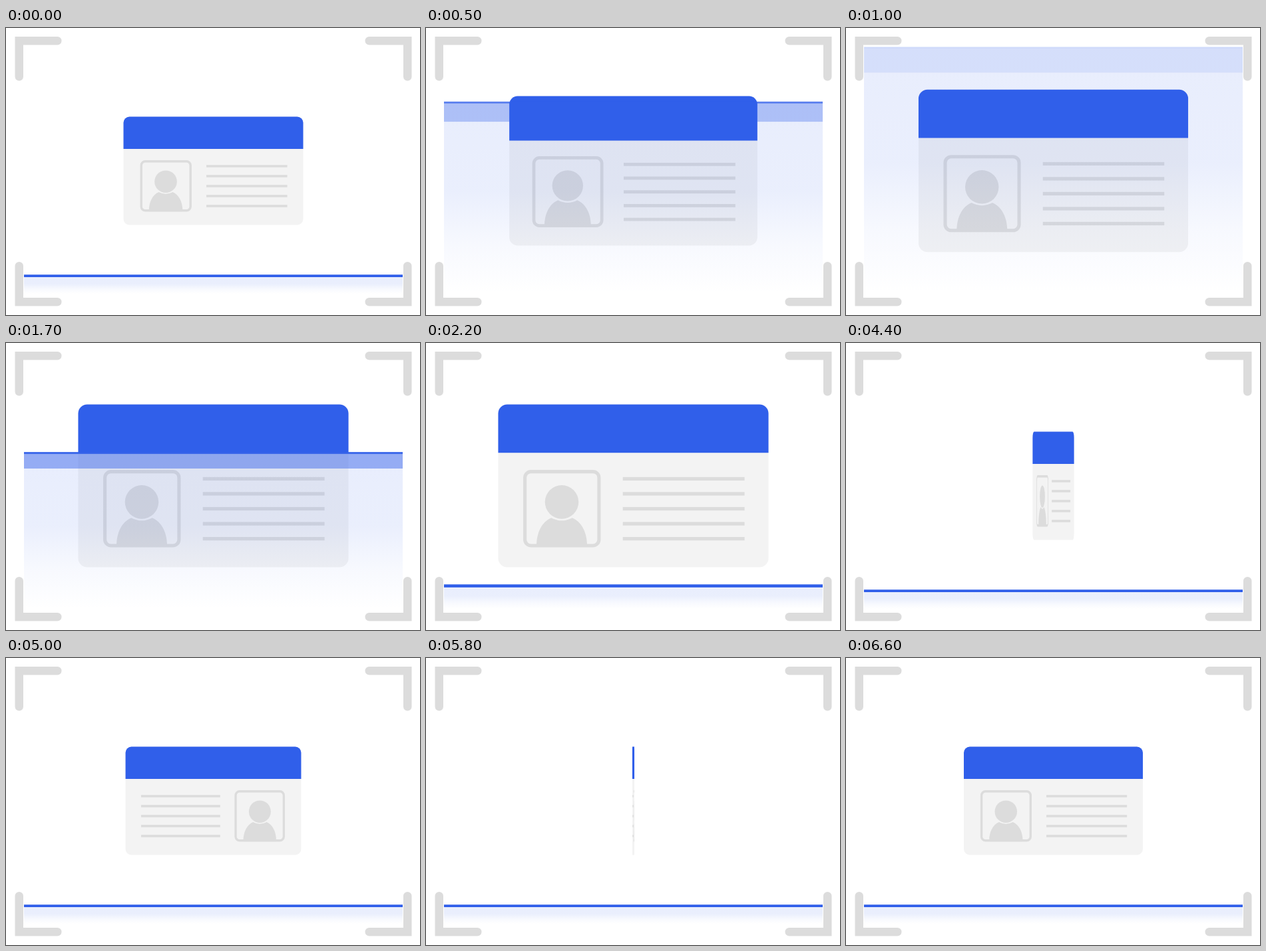
These frames come from a looping animation (622 px wide and 432 px high, 6.9 s). An HTML page with a canvas:

```html
<!DOCTYPE html>
<html lang="en">
<head>
<meta charset="utf-8">
<title>Card scan</title>
<style>
  html, body { margin: 0; width: 100%; height: 100%; overflow: hidden; background: #fff; }
  canvas { display: block; }
</style>
</head>
<body>
<canvas id="stage" width="622" height="432"></canvas>
<script>
const W = 622, H = 432, LOOP = 6900, STEP = 100;
const BLUE = '48,95,234', GREY = '#dcdcdc', PAPER = '#f3f3f3';
const CX = 311.5, CY = 215;
const ctx = document.getElementById('stage').getContext('2d');

const blue = a => `rgba(${BLUE},${a})`;
const mix = (a, b, k) => a + (b - a) * k;

// Critically damped spring from 0 to 1, starting at the given time.
function spring(t, start) {
  const u = Math.max(0, t - start) * 0.0086;
  return 1 - (1 + u) * Math.exp(-u);
}

function rect(x, y, w, h, fill) {
  ctx.fillStyle = fill;
  ctx.fillRect(x, y, w, h);
}

function brackets() {
  ctx.strokeStyle = GREY;
  ctx.lineWidth = 12.5;
  ctx.lineCap = 'round';
  ctx.lineJoin = 'miter';
  for (const sx of [1, -1]) for (const sy of [1, -1]) {
    ctx.save();
    ctx.translate(311.5, 215.75);
    ctx.scale(sx, sy);
    ctx.beginPath();
    ctx.moveTo(-291.75, -142.5);
    ctx.lineTo(-291.75, -196.5);
    ctx.lineTo(-234.2, -196.5);
    ctx.stroke();
    ctx.restore();
  }
}

function portrait() {
  ctx.strokeStyle = GREY;
  ctx.lineWidth = 3.4;
  ctx.beginPath();
  ctx.roundRect(203.2, 200.8, 74, 74, 6);
  ctx.stroke();

  ctx.fillStyle = GREY;
  ctx.beginPath();
  ctx.arc(240, 231.2, 16.8, 0, Math.PI * 2);
  ctx.fill();

  ctx.beginPath();
  ctx.moveTo(214.8, 275);
  ctx.bezierCurveTo(214.8, 262, 220, 251, 229.5, 247);
  ctx.quadraticCurveTo(240, 252.5, 250.5, 247);
  ctx.bezierCurveTo(260, 251, 265.4, 262, 265.4, 275);
  ctx.fill();
}

function card(size, flip) {
  ctx.save();
  ctx.translate(CX, CY);
  ctx.scale(size * flip, size);
  ctx.translate(-CX, -CY);
  ctx.beginPath();
  ctx.roundRect(176.5, 133.5, 270, 163, 9);
  ctx.fillStyle = PAPER;
  ctx.fill();
  ctx.beginPath();
  ctx.roundRect(176.5, 133.5, 270, 48.5, [9, 9, 0, 0]);
  ctx.fillStyle = blue(1);
  ctx.fill();
  portrait();
  for (let i = 0; i < 5; i++) rect(301, 206.2 + 15 * i, 121.6, 3.5, GREY);
  ctx.restore();
}

// lift: 0 = bar resting at the bottom, 1 = bar at the top
function scanner(lift) {
  const x = 27, w = 569, end = 400;
  const y = mix(371.5, 26, lift);
  const glow = ctx.createLinearGradient(0, y, 0, end);
  glow.addColorStop(0, blue(0.11));
  glow.addColorStop(0.47, blue(0.102));
  glow.addColorStop(0.74, blue(0.04));
  glow.addColorStop(1, blue(0));
  rect(x, y, w, end - y, glow);
  rect(x, y, w, mix(3.5, 39, lift), blue(mix(1, 0.1, lift)));
  rect(x, y, w, mix(3.5, 2.5, lift), blue(1 - lift ** 4));
}

function draw(t) {
  const grow = spring(t, 184);
  const lift = grow - spring(t, 1540);
  const size = 1 + 0.504 * (grow - spring(t, 2888));
  const flip = 1 - 2 * (spring(t, 4245) - spring(t, 5607));
  rect(0, 0, W, H, '#fff');
  card(size, flip);
  scanner(Math.max(0, lift));
  brackets();
}

function tick() {
  const t = performance.now() % LOOP;
  draw(Math.floor(t / STEP) * STEP);
  requestAnimationFrame(tick);
}
tick();
</script>
</body>
</html>
```
